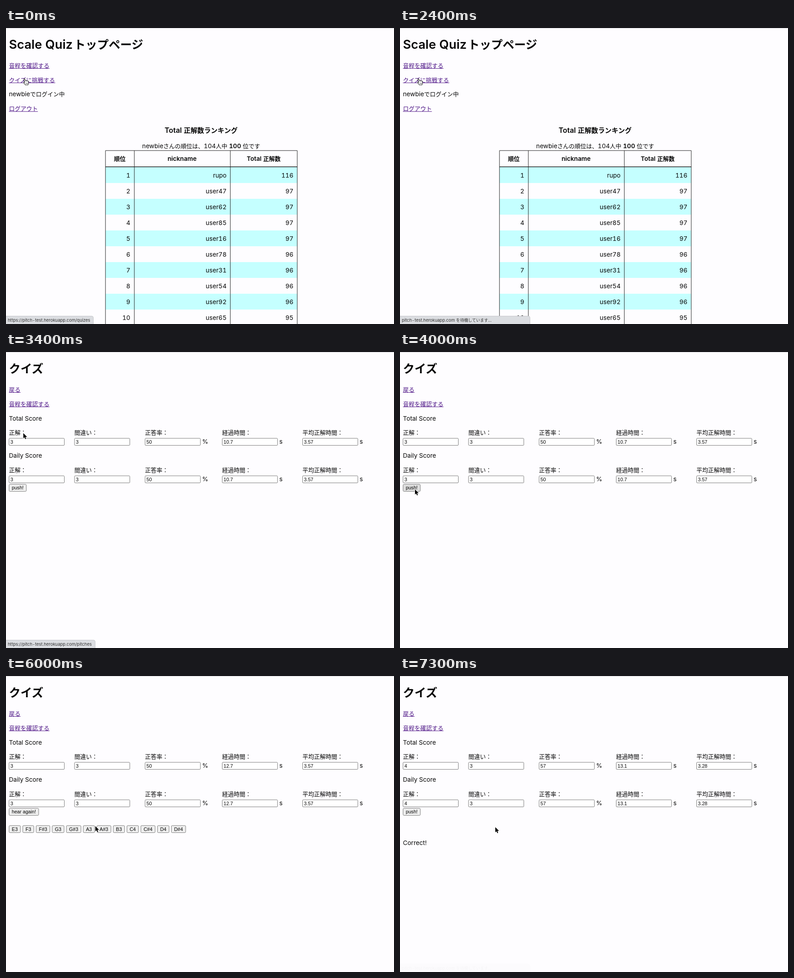
Animation, 855 px wide and 655 px high, one loop 7400 ms. Source, as an HTML page:

```html
<!DOCTYPE html>
<html lang="ja">
<head>
<meta charset="utf-8">
<title>Scale Quiz</title>
<style>
  html, body { margin: 0; width: 100%; height: 100%; overflow: hidden; background: #fefdff; }
  svg { display: block; font-family: "Noto Sans CJK JP", "Noto Sans CJK", sans-serif; }
  .latin { font-family: Inter, sans-serif; font-size: 1.07em; font-variant-numeric: tabular-nums; }
  .field { font: 10.63px "Liberation Sans", sans-serif; }
</style>
</head>
<body>
<svg id="stage" width="855" height="655" viewBox="0 0 855 655"></svg>
<script>
const LOOP = 7400, STEP = 100, EM = 12.75, INK = '#060606';
const stage = document.getElementById('stage');
const ruler = document.createElement('canvas').getContext('2d');
ruler.font = '10.63px "Liberation Sans", sans-serif';

const clamp01 = v => Math.max(0, Math.min(1, v));
const rect = (x, y, w, h, attrs) => `<rect x="${x}" y="${y}" width="${w}" height="${h}" ${attrs}/>`;

// Latin runs get their own face and a slightly larger size.
const mix = s => s.replace(/[ -~]+/g, run => `<tspan class="latin">${run}</tspan>`);

function text(x, y, s, { size = EM, weight = 400, anchor = 'start', color = INK } = {}) {
  return `<text x="${x}" y="${y}" font-size="${size}" font-weight="${weight}" ` +
    `text-anchor="${anchor}" fill="${color}" xml:space="preserve">${mix(s)}</text>`;
}

const title = (x, s) => text(x, 46.3, s, { size: 25.5, weight: 600 });
const link = (y, s) => text(6.5, y, s, { color: '#4b1385' }) +
  rect(6.5, y + 1.3, s.length * EM, 1, 'fill="#551a8b"');

// ---- ranking page ----
const ranking = [
  ['rupo', 116], ['user47', 97], ['user62', 97], ['user85', 97], ['user16', 97],
  ['user78', 96], ['user31', 96], ['user54', 96], ['user92', 96], ['user65', 95]
];

function topPage() {
  const middle = { anchor: 'middle', weight: 600 };
  const end = { anchor: 'end' };
  const rows = ranking.map(([name, score], i) => {
    const y = 308 + 35 * i, base = y + 22.6;
    return (i % 2 ? '' : rect(219, y, 423, 35, 'fill="#c5ffff"')) +
      text(273.8, base, String(i + 1), end) +
      text(486, base, name, end) +
      text(633.3, base, String(score), end);
  }).join('');
  const caption = 'newbieさんの順位は、104人中 |100| 位です'.split('|');
  return title(6.5, 'Scale Quiz') + title(149.7, 'トップページ') +
    link(87.7, '音程を確認する') + link(119.5, 'クイズに挑戦する') +
    text(6.5, 151.4, 'newbieでログイン中') + link(183, 'ログアウト') +
    text(430, 231.7, 'Total 正解数ランキング', { ...middle, size: 14.9 }) +
    `<text x="430" y="266" font-size="${EM}" text-anchor="middle" fill="${INK}" xml:space="preserve">` +
    `${mix(caption[0])}<tspan font-weight="600">${mix(caption[1])}</tspan>${mix(caption[2])}</text>` +
    rows +
    text(250.7, 294, '順位', middle) + text(388, 294, 'nickname', middle) +
    text(567.8, 294, 'Total 正解数', middle) +
    `<path d="M219.2 655V271.2H641.8V655M282.8 271V655M494.3 271V655" fill="none" stroke="#222"/>` +
    rect(219, 306.5, 423, 1.5, 'fill="#222"');
}

// ---- quiz page ----
const columns = [
  [6.5, '正解：', ''], [150.8, '間違い：', ''], [306.3, '正答率：', '%'],
  [476.3, '経過時間：', 's'], [653.3, '平均正解時間：', 's']
];
const notes = ['E3', 'F3', 'F#3', 'G3', 'G#3', 'A3', 'A#3', 'B3', 'C4', 'C#4', 'D4', 'D#4'];

const scoreRow = (y, values) => columns.map(([x, label, unit], i) =>
  text(x, y, label) +
  rect(x + .2, y + 8, 121.8, 15.6, 'rx="1.5" fill="#fff" stroke="#7b7b7b"') +
  `<text class="field" x="${x + 3.3}" y="${y + 19.6}" fill="${INK}">${values[i]}</text>` +
  (unit && text(x + 126, y + 19.8, unit))).join('');

const buttonWidth = label => ruler.measureText(label).width + 12.6;

function button(x, y, label, cursor) {
  const w = buttonWidth(label);
  const hover = cursor.x >= x && cursor.x <= x + w && cursor.y >= y && cursor.y <= y + 16;
  return rect(x + .3, y + .3, w - .6, 15.6, `rx="2" fill="${hover ? '#dedede' : '#efefef'}" stroke="#7b7b7b"`) +
    `<text class="field" x="${x + w / 2}" y="${y + 11.9}" text-anchor="middle" fill="#000">${label}</text>`;
}

function quizPage(t, cursor) {
  const asking = t >= 4100 && t < 6500, answered = t >= 6500;
  const elapsed = 10.7 + Math.min(2.4, Math.max(0, t - 4000) / 1000);
  const values = [answered ? 4 : 3, 3, answered ? 57 : 50, elapsed.toFixed(1), answered ? '3.28' : '3.57'];
  let x = 6.5, keys = '';
  if (asking) for (const note of notes) {
    keys += button(x, 330.7, note, cursor);
    x += buttonWidth(note) + 4.5;
  }
  return title(6.5, 'クイズ') + link(87.7, '戻る') + link(119.5, '音程を確認する') +
    text(6.5, 151.6, 'Total Score') + scoreRow(183, values) +
    text(6.5, 234.4, 'Daily Score') + scoreRow(266, values) +
    button(6.5, 292.5, asking ? 'hear again!' : 'push!', cursor) + keys +
    (answered ? text(6.5, 374.4, 'Correct!') : '');
}

// ---- browser status bar ----
const HOST = 'pitch-test.herokuapp.com';
const WAITING = HOST + ' を待機しています...';
// start, end, width, message, fades out at its end
const statuses = [
  [0, 1100, 192, `https://${HOST}/quizes`, false],
  [1100, 1800, 286, 'ホストを解決しています...', false],
  [1800, 2500, 286, WAITING, false],
  [2500, 3800, 196, `https://${HOST}/pitches`, true],
  [6500, 7306, 286, WAITING, true]
];

function statusBar(t) {
  const current = statuses.find(([from, to]) => t >= from && t < to);
  if (!current) return '';
  const [, to, w, message, fades] = current;
  const opacity = fades ? clamp01((to - t) / 180) : 1;
  const shape = d => `M0 ${638 - d}H${w - 4}q${4 + d} 0 ${4 + d} ${4 + d}V655H0Z`;
  return `<g opacity="${opacity}"><path d="${shape(1)}" fill="#c6c7cb"/>` +
    `<path d="${shape(0)}" fill="#dbdde1"/>` +
    text(4, 649.8, message, { size: 8.85, color: '#333' }) + '</g>';
}

// ---- pointer ----
const path = [[0, 41, 112], [3200, 41, 112], [3700, 33, 304], [5500, 33, 304], [6100, 210, 334.5], [LOOP, 210, 334.5]];

function cursorAt(t) {
  const i = path.findIndex(([time]) => time > t);
  const [t0, x0, y0] = path[i - 1], [t1, x1, y1] = path[i];
  const u = (t - t0) / (t1 - t0), k = u * u * (3 - 2 * u);
  return { x: x0 + (x1 - x0) * k, y: y0 + (y1 - y0) * k };
}

function pointer({ x, y }) {
  const hand = 'M-1.6 1.2Q-1 -.3 .4 .9L2.6 5.2Q3.6 4.1 4.6 5.1Q5.8 4.2 6.7 5.4Q8.4 5 8.6 7V10Q8.4 12 7.4 14H1.6Q.3 11.6 -2.2 9.2Q-2.6 7.6 -.6 8L.2 8.4Z';
  const arrow = 'M0 0V11.4L2.6 9L4.4 13.2L6.3 12.4L4.6 8.3H8.2Z';
  return `<g transform="translate(${x} ${y})">` + (y < 122
    ? `<path d="${hand}" fill="#fff" stroke="#222" stroke-width="1.1"/><path d="M3 9V12M4.8 9V12M6.5 9V12" stroke="#444" stroke-width=".7"/>`
    : `<path d="${arrow}" fill="#000" stroke="#fff" stroke-width="1.6" paint-order="stroke"/>`) + '</g>';
}

// ---- playback ----
let shown = -1;
function draw(now) {
  const t = Math.floor((now % LOOP) / STEP) * STEP;
  if (t !== shown && t >= 0) {
    shown = t;
    const cursor = cursorAt(t);
    stage.innerHTML = rect(0, 0, 855, 655, 'fill="#fefdff"') + rect(0, 0, 855, 1, 'fill="#d6d5d9"') +
      (t < 2500 ? topPage() : quizPage(t, cursor)) + statusBar(t) + pointer(cursor);
  }
  requestAnimationFrame(now => draw(now - start));
}
const start = performance.now();
draw(0);
</script>
</body>
</html>
```
